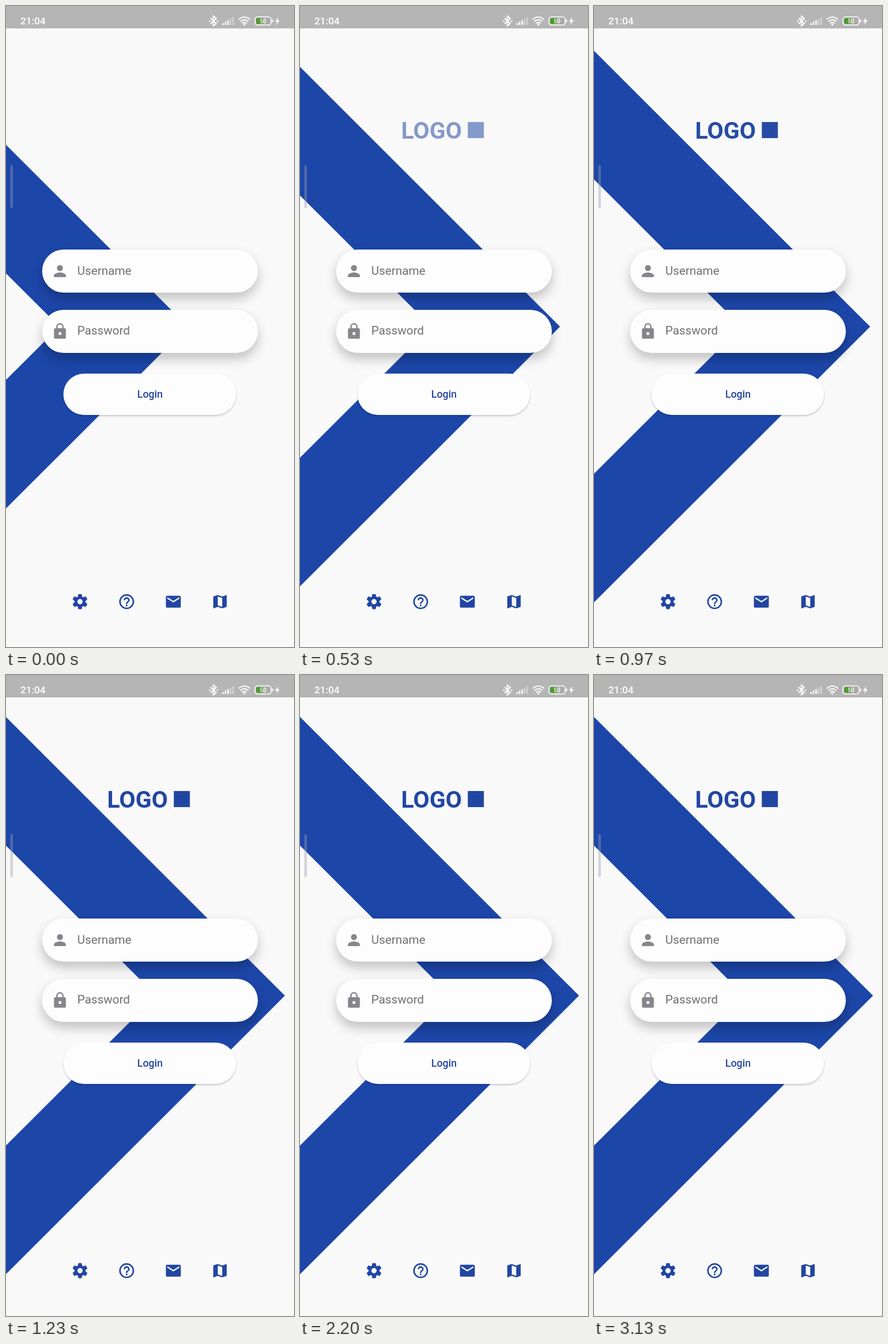
Animation of 502 by 1116 pixels, one loop 3160 ms. Source, as an HTML page:

```html
<!DOCTYPE html>
<html lang="en">
<head>
<meta charset="utf-8">
<title>Login</title>
<style>
  html, body { margin: 0; width: 100%; height: 100%; overflow: hidden; background: #f9f9fa; }
  body { position: relative; font-family: Roboto, "Open Sans", sans-serif; }
  svg { position: absolute; left: 0; top: 0; width: 502px; height: 1116px; overflow: hidden; }
  .pill { position: absolute; background: #fdfdfd; border-radius: 38px; }
  .field { left: 63px; width: 376px; height: 75px; box-shadow: 0 10px 20px rgba(0, 0, 0, .23); }
  .button { left: 100px; top: 640px; width: 301px; height: 72px; box-shadow: 0 2px 3px rgba(20, 20, 60, .22); }
  .blue { fill: #1c46a8; }
  .ink { fill: #2146a2; }
  .ring { fill: none; stroke: #2146a2; }
  .gray { fill: #85858b; }
  .hint { font-size: 20.8px; fill: #707073; }
  .login { font-size: 17.9px; font-weight: 500; fill: #2746a0; text-anchor: middle; }
  .brand { font-size: 41.2px; font-weight: 700; }
  .line { fill: none; stroke: #fff; stroke-width: 2; }
</style>
</head>
<body>
<svg viewBox="0 0 502 1116">
  <path id="chevron" class="blue" d="M486.3 558.3L-4 69V293L262 558.3L-4 823.3V1047.3Z"/>
  <g id="logo" class="ink">
    <text class="brand" x="176.2" y="230.8">LOGO</text>
    <rect x="292.5" y="202" width="28" height="28"/>
  </g>
</svg>

<div class="pill field" style="top:424px"></div>
<div class="pill field" style="top:529px"></div>
<div class="pill button"></div>

<svg viewBox="0 0 502 1116">
  <rect x="7.5" y="277" width="4.5" height="75" rx="2" fill="rgba(155,157,175,.41)"/>

  <!-- status bar -->
  <rect width="502" height="39" fill="#b6b5b5"/>
  <text x="25" y="32" font-size="17.3" font-weight="500" fill="#fff">21:04</text>
  <path class="line" d="M356.5 21L366.5 30.5L361.5 34.5V17.5L366.5 21.5L356.5 31"/>
  <path fill="#fff" d="M354 25h2.5v2.5h-2.5zM367.5 25h2.5v2.5h-2.5z"/>
  <g id="bars" fill="#fff"></g>
  <path class="line" d="M405.5 23.5Q415.5 15 425.5 23.5M408.5 27Q415.5 21 422.5 27M411.5 30.3Q415.5 27 419.5 30.3"/>
  <circle cx="415.5" cy="32.3" r="1.8" fill="#fff"/>
  <rect x="434" y="19" width="28" height="14" rx="4.5" fill="#aaa" stroke="#fff" stroke-width="1.6"/>
  <path fill="#4f9a31" d="M448 21H439Q436 21 436 24V28Q436 31 439 31H448Z"/>
  <text x="448" y="29.6" font-size="10" font-weight="500" fill="#fff" text-anchor="middle">50</text>
  <path fill="#fff" d="M463.5 23.5h2v5h-2zM474.5 19.5L469 27H472.5L471 33L477 25H473.3Z"/>

  <!-- form -->
  <text class="hint" x="124.2" y="467.5">Username</text>
  <text class="hint" x="124.2" y="572.3">Password</text>
  <text class="login" x="251" y="682.3">Login</text>
  <g class="gray" transform="translate(78.4 445.9) scale(1.3)">
    <circle cx="12" cy="8" r="4"/>
    <path d="M12 14c-2.67 0-8 1.34-8 4v2h16v-2c0-2.66-5.33-4-8-4z"/>
  </g>
  <g transform="translate(78.4 550.7) scale(1.3)">
    <rect class="gray" x="4" y="8" width="16" height="14" rx="2"/>
    <path d="M8 9V6a4 4 0 0 1 8 0V9" fill="none" stroke="#85858b" stroke-width="1.9"/>
    <circle cx="12" cy="15" r="2" fill="#fdfdfd"/>
  </g>

  <!-- bottom icons -->
  <g class="ink" transform="translate(113.4 1021.5) scale(1.3)">
    <circle class="ring" cx="12" cy="12" r="5.4" stroke-width="3.7"/>
    <g id="teeth"></g>
  </g>
  <g class="ink" transform="translate(194.7 1021.5) scale(1.3)">
    <circle class="ring" cx="12" cy="12" r="9" stroke-width="2"/>
    <path d="M12 6c-2.21 0-4 1.79-4 4h2c0-1.1.9-2 2-2s2 .9 2 2c0 2-3 1.75-3 5h2c0-2.25 3-2.5 3-5 0-2.21-1.79-4-4-4zM11 16h2v2h-2z"/>
  </g>
  <g class="ink" transform="translate(276.1 1021.5) scale(1.3)">
    <rect x="2" y="4" width="20" height="16" rx="2"/>
    <path d="M20 8l-8 5-8-5V6l8 5 8-5z" fill="#f9f9fa"/>
  </g>
  <g class="ink" transform="translate(357.4 1021.5) scale(1.3)">
    <path fill-rule="evenodd" d="M20.5 3L15 5.1 9 3 3.36 4.9Q3 5 3 5.4V20.5Q3 21 3.5 21L9 18.9l6 2.1 5.64-1.9Q21 19 21 18.6V3.5Q21 3 20.5 3zM15 19l-6-2.11V5l6 2.11z"/>
  </g>
</svg>

<script>
  const LOOP = 3160, SLIDE = 1300, FADE = 1000;
  const $ = id => document.getElementById(id);

  function add(parent, tag, attrs) {
    const el = document.createElementNS("http://www.w3.org/2000/svg", tag);
    for (const key in attrs) el.setAttribute(key, attrs[key]);
    parent.append(el);
  }

  for (let i = 0; i < 5; i++) {
    const h = 3 + i * 2.6;
    add($("bars"), "rect", { x: 377 + i * 4.4, y: 33 - h, width: 2.6, height: h, opacity: i < 3 ? 1 : .4 });
  }
  for (let i = 0; i < 6; i++) {
    add($("teeth"), "path", { d: "M10 2.2h4l.9 4.6h-5.8z", transform: `rotate(${i * 60} 12 12)`,
      stroke: "#2146a2", "stroke-width": .7, "stroke-linejoin": "round" });
  }

  // Runs from one state to another, then holds until the loop ends.
  function play(id, prop, from, to, time, easing) {
    return $(id).animate([
      { [prop]: from, offset: 0, easing },
      { [prop]: to, offset: time / LOOP },
      { [prop]: to, offset: 1 }
    ], { duration: LOOP, iterations: Infinity });
  }

  const runs = [
    play("chevron", "transform", "translateX(-169px)", "translateX(0px)", SLIDE, "cubic-bezier(0,.2,.2,1)"),
    play("logo", "opacity", 0, 1, FADE, "linear")
  ];
  const start = document.timeline.currentTime;
  runs.forEach(run => run.startTime = start);
</script>
</body>
</html>
```
